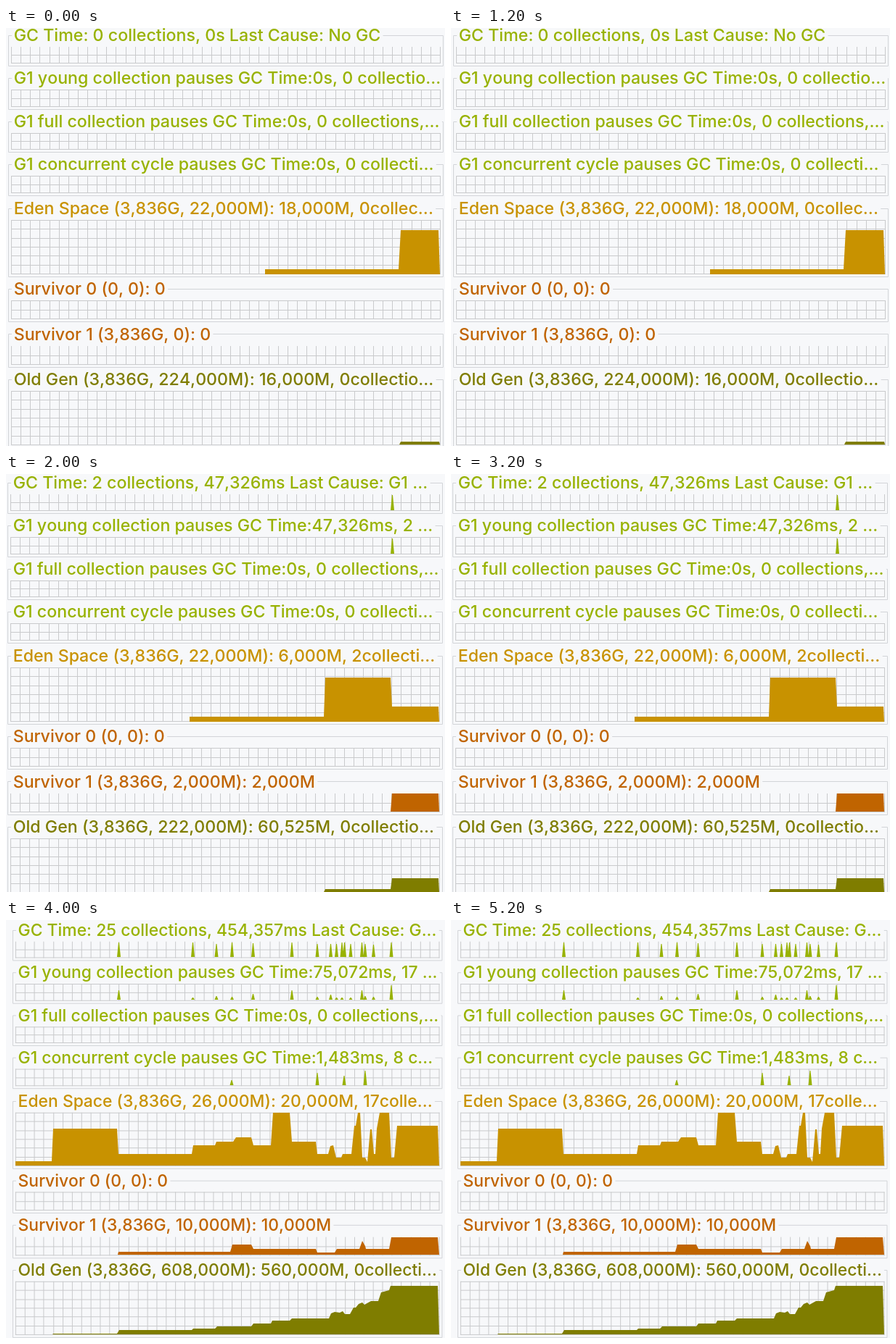
An HTML page that plays this animation: 605 px wide and 577 px high, repeating every 6 s.

```html
<!DOCTYPE html>
<html lang="en">
<head>
<meta charset="utf-8">
<title>GC monitor</title>
<style>
  html, body { margin: 0; width: 100%; height: 100%; overflow: hidden; background: #f7f8fa; }
  svg { display: block; width: 605px; height: 577px; }
  text {
    font: 500 23.2px Inter, sans-serif;
    font-optical-sizing: none;
    font-kerning: none;
    font-variant-ligatures: none;
    white-space: pre;
  }
  .grid { stroke: #c9cacc; fill: none; }
  .edge { stroke: #d2d4d8; fill: none; }
</style>
</head>
<body>
<svg id="stage" viewBox="0 0 605 577"></svg>
<script>
const NS = 'http://www.w3.org/2000/svg';
const stage = document.getElementById('stage');
const HOLD = 2000;
const GREEN = '#98b200', AMBER = '#c89200', RUST = '#c06400', OLIVE = '#7f7d00';

// title middle, graph top, graph bottom, colour, grid open at the top
const panels = [
  [10, 26, 48, GREEN, true],
  [69, 85, 108, GREEN],
  [129, 145, 167, GREEN],
  [188, 204, 227, GREEN],
  [249, 265, 339, AMBER],
  [360, 376, 401, RUST],
  [422.5, 439, 464, RUST, true],
  [485, 501, 575, OLIVE]
];

const full = 'G1 full collection pauses GC Time:0s, 0 collections,...';
const survivor0 = 'Survivor 0 (0, 0): 0';

// Sharp peaks as [x, height] pairs
const peaks = (base, list) => list.map(([x, h]) =>
  `M${x - 2.5} ${base}L${x - .5} ${base - h}h1L${x + 2.5} ${base}z`).join('');

const allPauses = [[155.5, 20], [257.5, 20], [290, 18], [311.5, 20], [340.5, 19], [394, 20],
  [429, 18], [447.5, 18], [455.5, 18], [463, 20], [466.5, 20], [475, 18],
  [490.5, 20], [495, 18], [506.5, 17], [531, 20]];
const youngPauses = [[155.5, 13], [257.5, 3], [290, 5], [311.5, 4], [340.5, 8], [394, 13],
  [429, 4], [447.5, 7], [455.5, 3], [463, 3], [475, 3],
  [490.5, 13], [495, 5], [506.5, 4], [531, 20]];

const states = [
  {
    move: 'translate(0 0)',
    titles: [
      'GC Time: 0 collections, 0s Last Cause: No GC',
      'G1 young collection pauses GC Time:0s, 0 collectio...',
      full,
      'G1 concurrent cycle pauses GC Time:0s, 0 collecti...',
      'Eden Space (3,836G, 22,000M): 18,000M, 0collec...',
      survivor0,
      'Survivor 1 (3,836G, 0): 0',
      'Old Gen (3,836G, 224,000M): 16,000M, 0collectio...'
    ],
    charts: {
      4: 'M357 340V333H541L544 279H596L598 340z',
      7: 'M542 575L544 571H597L598 575z'
    }
  },
  {
    move: 'translate(-1 2)',
    titles: [
      'GC Time: 2 collections, 47,326ms Last Cause: G1 ...',
      'G1 young collection pauses GC Time:47,326ms, 2 ...',
      full,
      'G1 concurrent cycle pauses GC Time:0s, 0 collecti...',
      'Eden Space (3,836G, 22,000M): 6,000M, 2collecti...',
      survivor0,
      'Survivor 1 (3,836G, 2,000M): 2,000M',
      'Old Gen (3,836G, 222,000M): 60,525M, 0collectio...'
    ],
    charts: {
      0: peaks(50, [[532.5, 21]]),
      1: peaks(110, [[532.5, 21]]),
      4: 'M253 342V335H438L440 281H530L532 321H596L597 342z',
      6: 'M530 466L532 441H596L597 466z',
      7: 'M438 577L440 573H530L532 558H596L597 577z'
    }
  },
  {
    move: 'translate(6 4.1) scale(.9875)',
    titles: [
      'GC Time: 25 collections, 454,357ms Last Cause: G...',
      'G1 young collection pauses GC Time:75,072ms, 17 ...',
      full,
      'G1 concurrent cycle pauses GC Time:1,483ms, 8 c...',
      'Eden Space (3,836G, 26,000M): 20,000M, 17colle...',
      survivor0,
      'Survivor 1 (3,836G, 10,000M): 10,000M',
      'Old Gen (3,836G, 608,000M): 560,000M, 0collecti...'
    ],
    charts: {
      0: peaks(51, allPauses),
      1: peaks(110, youngPauses),
      3: peaks(228, [[311, 7], [429, 17], [466, 13], [495, 20]]),
      4: 'M13 339V333H63L65 288H153L155 323H256L258 311H288L290 306H313L317 300H338L341 311' +
         'H365L368 266H391L394 306H427L429 323H444L447 312L451 311L455 328H462L464 323H476' +
         'L480 284H482L485 266H488L491 328H495L498 334L502 289H504L507 323H509L511 288' +
         'L515 266H528L531 328H535L539 284H595L597 339z',
      6: 'M154 462L155 458H309L312 448H338L341 454H427L429 459H453L456 454H487L491 443' +
         'L495 450L496 454H528L531 438H595L597 462z',
      7: 'M64 572L65 571H153L156 566H256L258 564H288L291 561H338L341 557H365L367 553H391' +
         'L394 550H445L448 543L453 541L460 542L464 540L467 544H474L479 535H482L486 530' +
         'L491 528L494 531L503 526H513L517 514L528 511L530 505H595L597 572z'
    }
  }
];

function add(parent, tag, attrs, text) {
  const el = document.createElementNS(NS, tag);
  for (const k in attrs) el.setAttribute(k, attrs[k]);
  if (text) el.textContent = text;
  return parent.appendChild(el);
}

const snap = v => Math.round(v) + .5;

function gridPath(top, bottom, open) {
  const cols = 45, rows = Math.round((bottom - top) / 12.5);
  let d = '';
  for (let i = 0; i <= cols; i++) d += `M${snap(7 + i * 591 / cols)} ${top}V${bottom + 1}`;
  for (let i = open ? 1 : 0; i <= rows; i++) d += `M7 ${snap(top + i * (bottom - top) / rows)}H599`;
  return d;
}

function draw(state) {
  stage.replaceChildren();
  add(stage, 'rect', { width: 605, height: 577, fill: '#f7f8fa' });
  const frame = add(stage, 'g', { transform: state.move });
  panels.forEach(([mid, top, bottom, color, open], i) => {
    const label = add(frame, 'text', { x: 10.7, y: mid + 8.2, fill: color }, state.titles[i]);
    const end = Math.min(602, 14 + label.getComputedTextLength());
    const line = Math.floor(mid) + .5;
    add(frame, 'path', { class: 'edge', d: `M8 ${line}H3.5V${bottom + 4.5}H602.5V${line}H${end}` });
    add(frame, 'path', { class: 'grid', d: gridPath(top, bottom, open) });
    if (state.charts[i]) add(stage, 'path', { d: state.charts[i], fill: color });
  });
}

let shown = -1;
const start = performance.now();

function tick() {
  const t = (performance.now() - start) % (HOLD * states.length);
  const now = Math.floor(t / HOLD);
  if (now !== shown) draw(states[shown = now]);
  requestAnimationFrame(tick);
}
tick();
</script>
</body>
</html>
```
